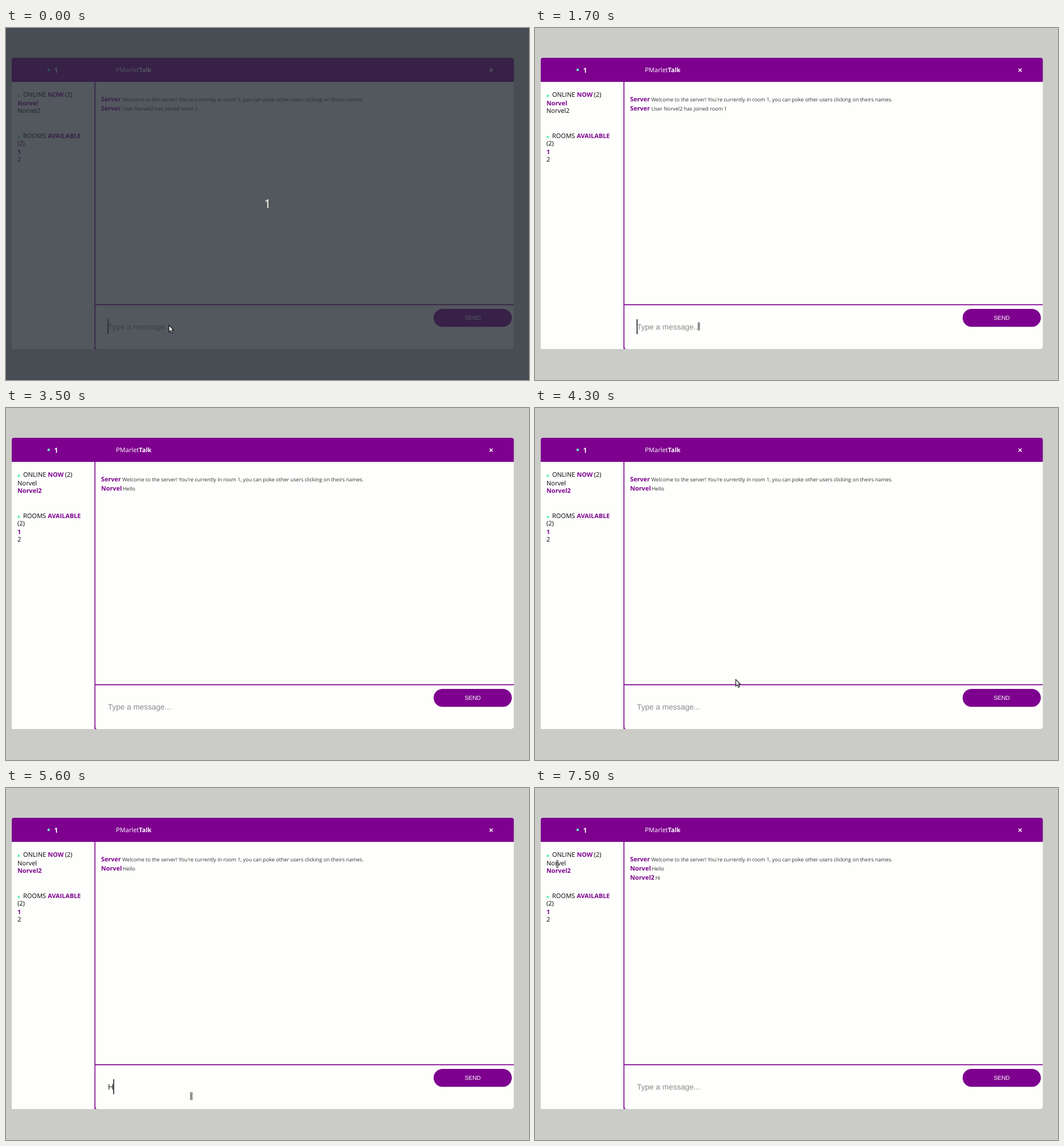
An HTML page that plays this animation: 913 by 614 pixels, repeating every 8 s.

```html
<!DOCTYPE html>
<html lang="en">
<head>
<meta charset="utf-8">
<title>Chat demo</title>
<style>
  html, body { margin: 0; width: 100%; height: 100%; overflow: hidden; background: #cbccc8; }
  svg { display: block; }
  text { font: 11px "Open Sans", "Noto Sans", sans-serif; text-rendering: geometricPrecision; white-space: pre; }
  .bold { font-weight: 700; font-size: 10.8px; }
  .accent { fill: #7d008e; }
  .light { fill: #fff; }
  .message { font-size: 8.96px; fill: #333; }
  .field { font: 13.5px "Liberation Sans", Arial, sans-serif; fill: #222; }
  .hint { fill: #8a8a8a; }
  .send { font: 10.2px "Liberation Sans", Arial, sans-serif; fill: #fff; text-anchor: middle; }
  .count { font: 21px "Noto Sans", sans-serif; fill: #fffff0; text-anchor: middle; }
</style>
</head>
<body>
<svg width="913" height="614" viewBox="0 0 913 614">
  <rect width="913" height="614" fill="#cbccc8"/>
  <path d="M10 90H886.500V555a5 5 0 0 1-5 5H10z" fill="#fefffc"/>
  <path class="accent" d="M10 94V56a4 4 0 0 1 4-4H882.500a4 4 0 0 1 4 4V94z"/>
  <path class="accent" d="M154.500 94h1.600v387.800h730.400v1.600H156.100V556q0 3 2.500 4h-4.100z"/>
  <rect class="accent" x="746.500" y="490" width="136.500" height="31.300" rx="15.650"/>
  <text class="send" x="814.800" y="509">SEND</text>

  <circle cx="74.500" cy="73" r="2.200" fill="#70f3c2"/>
  <text class="bold light" x="84" y="77.500" style="font-size:12px">1</text>
  <text class="light" x="192" y="77">PMarlet<tspan class="bold">Talk</tspan></text>
  <path d="M844.200 70.800l5.400 5.400m0-5.400l-5.400 5.400" stroke="#fff" stroke-width="1.500"/>

  <g fill="#6cefbc"><circle cx="22.300" cy="118.300" r="2.200"/><circle cx="22.300" cy="190" r="2.200"/></g>
  <text x="30" y="120.300">ONLINE</text>
  <text class="bold accent" x="73" y="120.300">NOW</text>
  <text x="103" y="120.300">(2)</text>
  <text x="30" y="192.300">ROOMS</text>
  <text class="bold accent" x="73" y="192.300">AVAILABLE</text>
  <text x="20" y="205.300">(2)</text>
  <text class="bold accent" x="20" y="220">1</text>
  <text x="20" y="233">2</text>

  <g id="live"></g>
  <g id="countdown">
    <rect width="913" height="614" fill="#262a34" opacity=".79"/>
    <text class="count" x="456.500" y="314">1</text>
  </g>
  <path id="arrow" d="M.5 .5V12.200l2.700-2.500 2 4.500 2-.9-2-4.300h3.500z" fill="#fff" stroke="#111" stroke-width="1.100"/>
  <g id="beam" fill="none">
    <path d="M-2-5h4M-2 5h4M0-5V5" stroke="#222" stroke-width="3"/>
    <path d="M-2-5h4M-2 5h4M0-5V5" stroke="#fff" stroke-width="1"/>
  </g>
</svg>
<script>
  const LOOP = 8000, STEP = 100;
  const users = ['Norvel', 'Norvel2'];
  const el = id => document.getElementById(id);

  // [time, typed text, caret x]; no caret when x is 0
  const input = [
    [0, '', 178], [400, 'H', 187.7], [1100, 'He', 195.2], [1200, 'Hel', 198.2],
    [1400, 'Hell', 201.2], [1700, '', 178], [2700, '', 0], [4600, '', 178],
    [5600, 'H', 187.7], [5800, 'Hi', 190.7], [6000, '', 178], [6500, '', 0]
  ];

  // [start, pointer kind, waypoints of [time, x, y]]
  const pointer = [
    [0, 'arrow', [[0, 284, 518]]],
    [400, 'beam', [[2200, 286, 520.5], [2300, 296, 505]]],
    [2400, 'arrow', [[2400, 320, 450], [2600, 361, 316]]],
    [2700, '', []],
    [4000, 'arrow', [[4100, 583, 61], [4200, 505, 200], [4300, 350, 473], [4400, 330, 525], [4500, 321, 540]]],
    [4600, '', []],
    [5000, 'beam', [[6400, 323.5, 537.5], [6500, 318, 545]]],
    [6600, 'arrow', [[6600, 298, 577], [6700, 240, 520], [7000, 50, 145]]],
    [7100, 'beam', [[7200, 35, 109.5], [7300, 33, 119], [7500, 39, 132.5]]]
  ];

  const latest = (list, t) => list.filter(item => item[0] <= t).pop();

  function along(points, t) {
    const next = points.findIndex(p => p[0] >= t);
    if (next < 1) return points.at(next).slice(1);
    const [a, b] = [points[next - 1], points[next]];
    const k = (t - a[0]) / (b[0] - a[0]);
    return [a[1] + (b[1] - a[1]) * k, a[2] + (b[2] - a[2]) * k];
  }

  const label = (x, y, cls, str) => `<text x="${x}" y="${y}" class="${cls}">${str}</text>`;

  function chatLines(t) {
    const welcome = ['Server', 203, "Welcome to the server! You're currently in room 1, you can poke other users clicking on theirs names."];
    const joined = ['Server', 203, `User ${users[1]} has joined room 1`];
    const hello = [users[0], 204, 'Hello'];
    const reply = [users[1], 210, 'Hi'];
    if (t < 3500) return t < 2000 ? [welcome, joined] : [welcome, joined, hello];
    return t < 6100 ? [welcome, hello] : [welcome, hello, reply];
  }

  function draw(t) {
    const self = t < 3500 ? 0 : 1;
    const [, typed, caret] = latest(input, t);
    let out = users.map((name, i) =>
      label(20, 135 + i * 13.3, i === self ? 'bold accent' : '', name)).join('');
    chatLines(t).forEach(([name, x, message], i) => {
      const y = 128.3 + i * 15.9;
      out += label(166, y, 'bold accent', name) + label(x, y, 'message', message);
    });
    out += typed ? label(178, 525.5, 'field', typed) : label(178, 525.5, 'field hint', 'Type a message...');
    if (caret) out += `<rect x="${caret - .5}" y="508" width="1.5" height="26" fill="#111"/>`;
    el('live').innerHTML = out;
    el('countdown').style.display = t < 400 ? '' : 'none';

    const [, kind, points] = latest(pointer, t);
    for (const id of ['arrow', 'beam']) el(id).style.display = id === kind ? '' : 'none';
    if (kind) el(kind).setAttribute('transform', `translate(${along(points, t)})`);
  }

  const start = performance.now();
  let shown = -1;
  function tick() {
    const t = Math.floor((performance.now() - start) % LOOP / STEP) * STEP;
    if (t !== shown) draw(shown = t);
    requestAnimationFrame(tick);
  }
  tick();
</script>
</body>
</html>
```
